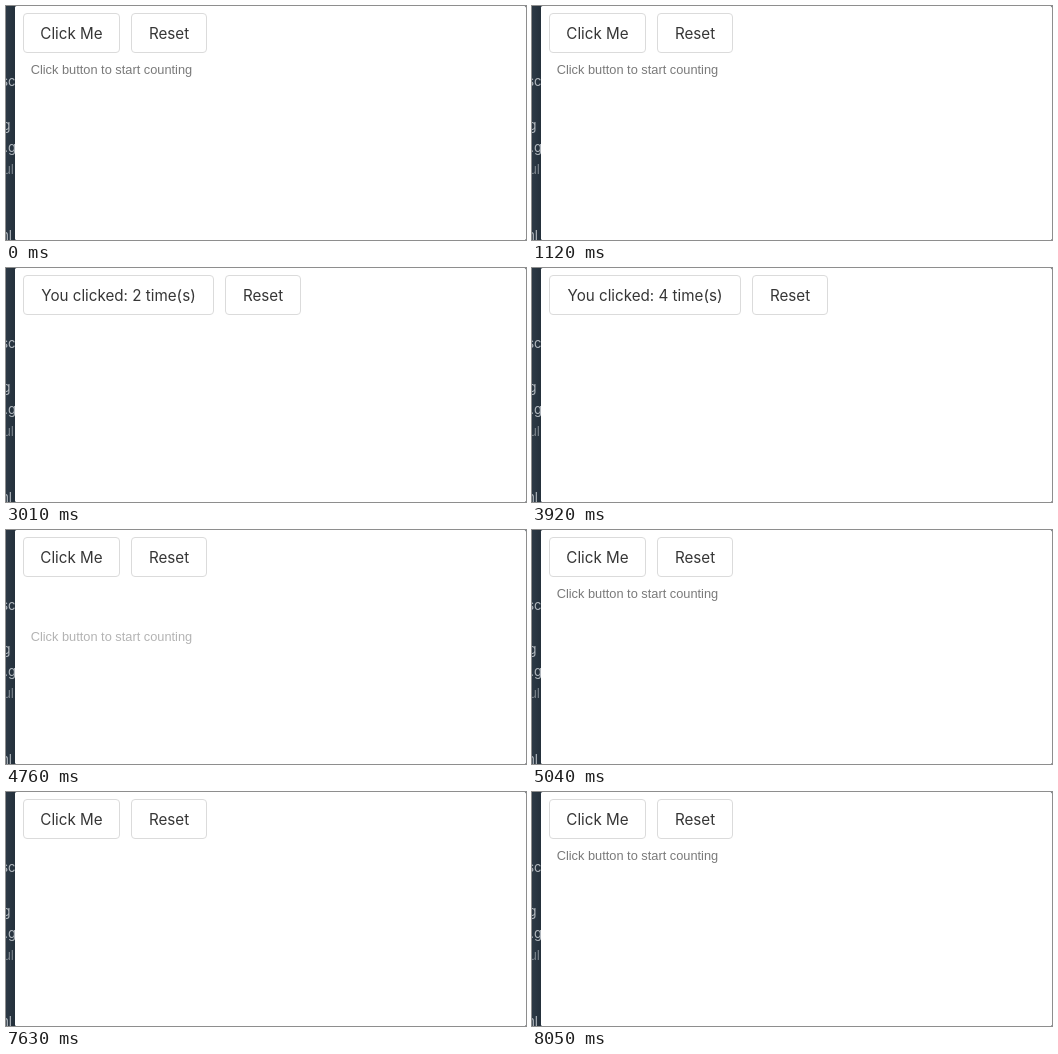
Animation, 520 px wide and 234 px high, one loop 8820 ms. Source, as an HTML page:

```html
<!DOCTYPE html>
<html lang="en">
<head>
<meta charset="utf-8">
<title>Click counter</title>
<style>
  html, body { margin: 0; width: 100%; height: 100%; overflow: hidden; background: #2b3743; }
  svg { display: block; width: 520px; height: 234px; }
  .button rect { fill: #fff; stroke: #dbdbdb; }
  .button text { font: 15.2px Inter, sans-serif; fill: #363636; text-anchor: middle; }
  #hint { font: 12.8px "Liberation Sans", sans-serif; fill: #7a7a7a; }
  .editor { font: 13px Inter, sans-serif; fill: #b4bac0; text-anchor: end; }
</style>
</head>
<body>
<svg viewBox="0 0 520 234">
  <defs>
    <linearGradient id="shade">
      <stop offset="0" stop-color="#2d3a46"/>
      <stop offset="1" stop-color="#24303b"/>
    </linearGradient>
  </defs>
  <rect width="520" height="234" fill="url(#shade)"/>
  <rect width="9" height="234" fill="url(#shade)"/>
  <g class="editor">
    <text x="9.5" y="80">sc</text>
    <text x="4.5" y="124">g</text>
    <text x="10" y="146">.g</text>
    <text x="8" y="168" fill="#7d868e">ul</text>
    <text x="6" y="234">ml</text>
  </g>
  <rect x="9" width="511" height="234" rx="1.5" fill="#fff"/>
  <g class="button" id="counter">
    <rect x="17.5" y="7.5" height="39" rx="3.5"/>
    <text y="33"></text>
  </g>
  <g class="button" id="reset">
    <rect x=".5" y="7.5" width="75" height="39" rx="3.5"/>
    <text x="38" y="33">Reset</text>
  </g>
  <text id="hint" x="24.7" y="68">Click button to start counting</text>
</svg>
<script>
const LOOP = 8820, STEP = 70, FLY = 100;
const WIDTHS = [96, 188, 190, 191, 191];

// [time, click count]
const clicks = [[0, 0], [1750, 1], [3010, 2], [3430, 3], [3920, 4],
                [4620, 0], [5880, 1], [6370, 2], [6860, 3], [7630, 0]];

// The hint drops out and flies back in: [time shown, animation start, duration, entering]
const flights = [[0, -400, 400, true], [1750, 1708, 200, false], [4620, 4663, 400, true],
                 [5880, 5834, 200, false], [7630, 7639, 400, true]];

const $ = selector => document.querySelector(selector);
const [box, label] = $('#counter').children;
const reset = $('#reset'), hint = $('#hint');
const latest = (events, t) => events.findLast(([time]) => time <= t);

function drawButtons(count) {
  const width = WIDTHS[count];
  box.setAttribute('width', width);
  label.setAttribute('x', 17.5 + width / 2);
  label.textContent = count ? `You clicked: ${count} time(s)` : 'Click Me';
  reset.setAttribute('transform', `translate(${width + 29})`);
}

function drawHint(t) {
  const [, start, duration, entering] = latest(flights, t);
  const progress = Math.min(1, Math.max(0, (t - start) / duration));
  const away = (entering ? 1 - progress : progress) ** 3;
  hint.setAttribute('transform', `translate(0 ${FLY * away})`);
  hint.setAttribute('opacity', 1 - away);
}

function draw(now) {
  const t = Math.floor(now % LOOP / STEP) * STEP;
  drawButtons(latest(clicks, t)[1]);
  drawHint(t);
}

const begin = performance.now();
function tick() {
  draw(performance.now() - begin);
  requestAnimationFrame(tick);
}
tick();
</script>
</body>
</html>
```
